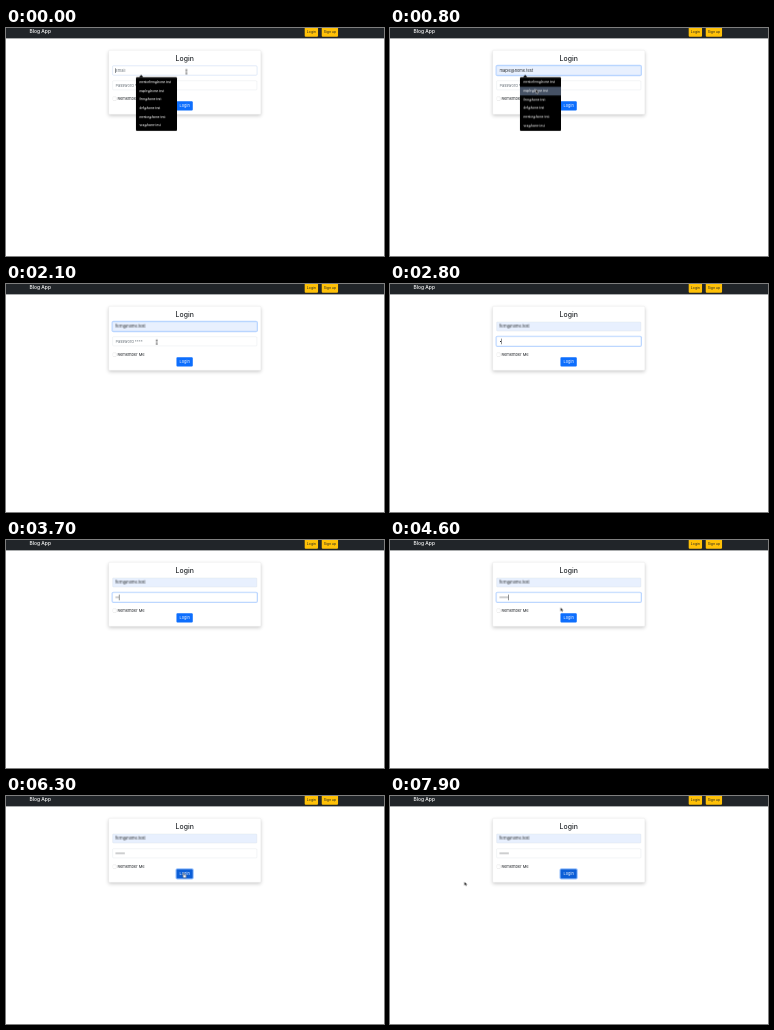
Animation of 378 by 228 pixels, one loop 8 s. Source, as an HTML page:

```html
<!DOCTYPE html>
<html lang="en">
<head>
<meta charset="utf-8">
<title>Login</title>
<style>
  html, body { margin: 0; width: 378px; height: 228px; overflow: hidden; background: #fff; }
  /* Laid out at desktop size, then scaled down to the stage */
  .page {
    position: absolute; left: 0; top: 0; width: 1530px; height: 923px;
    transform: scale(.24706); transform-origin: 0 0;
    font: 16px/24px Inter, "Open Sans", sans-serif; color: #212529; overflow: hidden;
  }
  .page * { box-sizing: border-box; }
  .abs, .page > *, .row, .input > *, .cursor svg { position: absolute; white-space: nowrap; }

  .nav { left: 0; top: 0; width: 1530px; height: 42px; background: #212529; }
  .brand { left: 95px; top: 3px; font-size: 20px; font-weight: 500; color: #fff; }
  .chip { top: -5px; height: 40px; padding-top: 9px; border-radius: 4px; background: #ffc107;
    font-size: 14px; text-align: center; }

  .card { left: 415px; top: 90px; width: 617px; height: 260px; background: #fff;
    border: 1px solid #d5d5d5; border-radius: 4px; box-shadow: 0 6px 16px rgba(0,0,0,.2); }
  .title { left: 415px; top: 106px; width: 617px; font-size: 28px; line-height: 34px;
    font-weight: 500; text-align: center; }
  .input { left: 431px; width: 585px; height: 38px; border: 1px solid #ced4da; border-radius: 4px; background: #fff; }
  .input > * { left: 11px; top: 6px; }
  .email { top: 153px; }
  .password { top: 213px; }
  .hint { color: #6c757d; }
  .box { left: 431px; top: 278px; width: 16px; height: 16px; border: 1px solid #bfbfbf; border-radius: 4px; }
  .remember { left: 451px; top: 274px; }
  .submit { left: 690px; top: 296px; width: 66px; height: 38px; padding-top: 7px; border-radius: 4px;
    background: #0d6efd; color: #fff; text-align: center; }
  .caret { display: inline-block; width: 2px; height: 19px; background: #212529; vertical-align: -4px; }
  .dots { height: 24px; border-right: 2px solid #212529; box-sizing: content-box !important;
    background: radial-gradient(circle, #212529 2.3px, transparent 2.8px) 0 50% / 7.2px 24px; }

  .menu { left: 526px; top: 199px; width: 166px; height: 218px; border-radius: 4px; background: #000; }
  .menu::before { content: ""; position: absolute; left: 12px; top: -9px;
    border: 9px solid transparent; border-top: 0; border-bottom-color: #000; }
  .row { left: 0; width: 166px; height: 35px; padding-left: 14px; font-size: 11.5px; line-height: 35px;
    font-weight: 500; color: #fff; }
  .pick { left: 0; top: 4px; width: 166px; height: 35px; background: #465265; }
  .cursor { left: 0; top: 0; width: 0; height: 0; }
  .cursor svg { left: 0; top: 0; overflow: visible; fill: #000; stroke: #fff; stroke-width: 1.5; }

  /* Timeline: 1% = 80 ms */
  .key { opacity: 0; animation: 8s step-end infinite; }
  .email .hint { animation-name: email-hint; }
  .email .first { animation-name: first; }
  .email .second { animation-name: second; }
  .email .third { animation-name: third; }
  .email .caret { animation-name: email-caret; }
  .email { animation: email-fill 8s step-end infinite, email-focus 8s linear infinite; }
  .password { animation: password-focus 8s linear infinite; }
  .password .hint { animation-name: password-hint; }
  .dots { animation: typing 8s step-end infinite, blink 8s step-end infinite; }
  .menu { animation-name: menu; }
  .pick { animation-name: pick; }
  .submit { animation: hover 8s step-end infinite, ring 8s linear infinite; }
  .cursor { animation: travel 8s linear infinite; }
  .arrow { animation-name: arrow; }
  .beam { animation-name: beam; }
  .hand { animation-name: hand; }

  @keyframes email-hint { 0% { opacity: 1 } 3.7% { opacity: 0 } }
  @keyframes first { 0% { opacity: 0 } 3.7% { opacity: 1 } 7.4% { opacity: 0 } }
  @keyframes second { 0% { opacity: 0 } 7.4% { opacity: 1 } 12.4% { opacity: 0 } }
  @keyframes third { 0% { opacity: 0 } 12.4%, 100% { opacity: 1 } }
  @keyframes email-caret { 0% { opacity: 0 } 16.2% { opacity: 1 } 22.4% { opacity: 0 } }
  @keyframes email-fill { 0% { background: #fff } 3.7%, 100% { background: #e8f0fe } }
  @keyframes email-focus {
    0% { border-color: #b4c4e2; box-shadow: 0 0 0 1.5px rgba(13,110,253,.1) }
    1.2%, 27.4% { border-color: #86b7fe; box-shadow: 0 0 0 4px rgba(13,110,253,.25) }
    29.3%, 100% { border-color: #ced4da; box-shadow: 0 0 0 0 rgba(13,110,253,0) }
  }
  @keyframes password-focus {
    0%, 27.4% { border-color: #ced4da; box-shadow: 0 0 0 0 rgba(13,110,253,0) }
    29.3%, 63.6% { border-color: #86b7fe; box-shadow: 0 0 0 4px rgba(13,110,253,.25) }
    65.5%, 100% { border-color: #ced4da; box-shadow: 0 0 0 0 rgba(13,110,253,0) }
  }
  @keyframes password-hint { 0% { opacity: 1 } 34.9% { opacity: 0 } }
  @keyframes typing {
    0% { width: 0 } 34.9% { width: 7.2px } 41.2% { width: 14.4px } 47.4% { width: 21.6px }
    49.9% { width: 28.8px } 53.6%, 100% { width: 36px }
  }
  @keyframes blink {
    0% { border-color: transparent } 27.4% { border-color: #212529 }
    59.9%, 100% { border-color: transparent }
  }
  @keyframes menu { 0% { opacity: 1 } 16.2% { opacity: 0 } }
  @keyframes pick {
    0% { opacity: 0; top: 4px } 3.7% { opacity: 1; top: 4px }
    7.4% { opacity: 1; top: 39px } 12.4%, 100% { opacity: 1; top: 74px }
  }
  @keyframes hover {
    0% { background: #0d6efd } 61.2% { background: #0b5ed7 }
    64.9% { background: #0a53be } 68.7% { background: #0b5ed7 }
    72.4% { background: #0a53be } 73.7% { background: #0b5ed7 }
    76.2% { background: #0a53be } 78.7%, 100% { background: #0b5ed7 }
  }
  @keyframes ring {
    0%, 63.6% { box-shadow: 0 0 0 0 rgba(49,132,253,0) }
    65.5%, 100% { box-shadow: 0 0 0 4px rgba(49,132,253,.5) }
  }
  @keyframes travel {
    0%, 1% { transform: translate(730px, 177px) }
    4% { transform: translate(655px, 215px) }
    9%, 11.2% { transform: translate(590px, 248px) }
    13%, 22.5% { transform: translate(581px, 286px) }
    26.2%, 54.9% { transform: translate(610px, 235px) }
    57.4%, 58.7% { transform: translate(690px, 273px) }
    62.4%, 87.4% { transform: translate(719px, 312px) }
    89.5% { transform: translate(724px, 279px) }
    92.4%, 95.4% { transform: translate(719px, 312px) }
    98.7%, 100% { transform: translate(301px, 347px) }
  }
  @keyframes arrow {
    0% { opacity: 0 } 2.4% { opacity: 1 } 25.2% { opacity: 0 } 54.9% { opacity: 1 }
    61.2% { opacity: 0 } 88.6% { opacity: 1 } 91% { opacity: 0 } 95.8%, 100% { opacity: 1 }
  }
  @keyframes beam { 0% { opacity: 1 } 2.4% { opacity: 0 } 25.2% { opacity: 1 } 34.9% { opacity: 0 } }
  @keyframes hand {
    0% { opacity: 0 } 61.2% { opacity: 1 } 88.6% { opacity: 0 } 91% { opacity: 1 } 95.8% { opacity: 0 }
  }
</style>
</head>
<body>
<div class="page">
  <div class="nav"></div>
  <div class="brand">Blog App</div>
  <div class="chip" style="left:1209px;width:54px">Login</div>
  <div class="chip" style="left:1278px;width:66px">Sign up</div>

  <div class="card"></div>
  <div class="title">Login</div>
  <div class="input email">
    <span class="key hint">Email</span>
    <span class="key hint" style="left:10px"><i class="abs" style="left:0;top:3px;width:2px;height:19px;background:#212529"></i></span>
    <span class="key first">mentorfern@home.test</span>
    <span class="key second">maple@home.test</span>
    <span class="key third">fern@home.test<i class="key caret"></i></span>
  </div>
  <div class="input password">
    <span class="key hint">Password ****</span>
    <span class="dots"></span>
  </div>
  <div class="box"></div>
  <div class="remember">Remember Me</div>
  <div class="submit">Login</div>

  <div class="key menu">
    <div class="key abs pick"></div>
    <div class="row" style="top:4px">mentorfern@home.test</div>
    <div class="row" style="top:39px">maple@home.test</div>
    <div class="row" style="top:74px">fern@home.test</div>
    <div class="row" style="top:109px">def@home.test</div>
    <div class="row" style="top:144px">mentor@home.test</div>
    <div class="row" style="top:179px">vxz@home.test</div>
  </div>

  <div class="cursor">
    <svg class="key arrow" width="14" height="20"><path d="M0 0V16L4 12.5L6.5 18.5L9.5 17L7 11.5H12Z"/></svg>
    <svg class="key beam" width="8" height="18"><path d="M-4-9Q0-9 0-6Q0-9 4-9M0-6V6M-4 9Q0 9 0 6Q0 9 4 9" style="fill:none;stroke:#000;stroke-width:2"/></svg>
    <svg class="key hand" width="16" height="20"><path d="M-2 1Q0-1 2 1V7L10 9Q12 10 11 14L9 19H0L-5 12Q-6 9-2 11Z" style="fill:#fff;stroke:#000"/></svg>
  </div>
</div>
</body>
</html>
```
